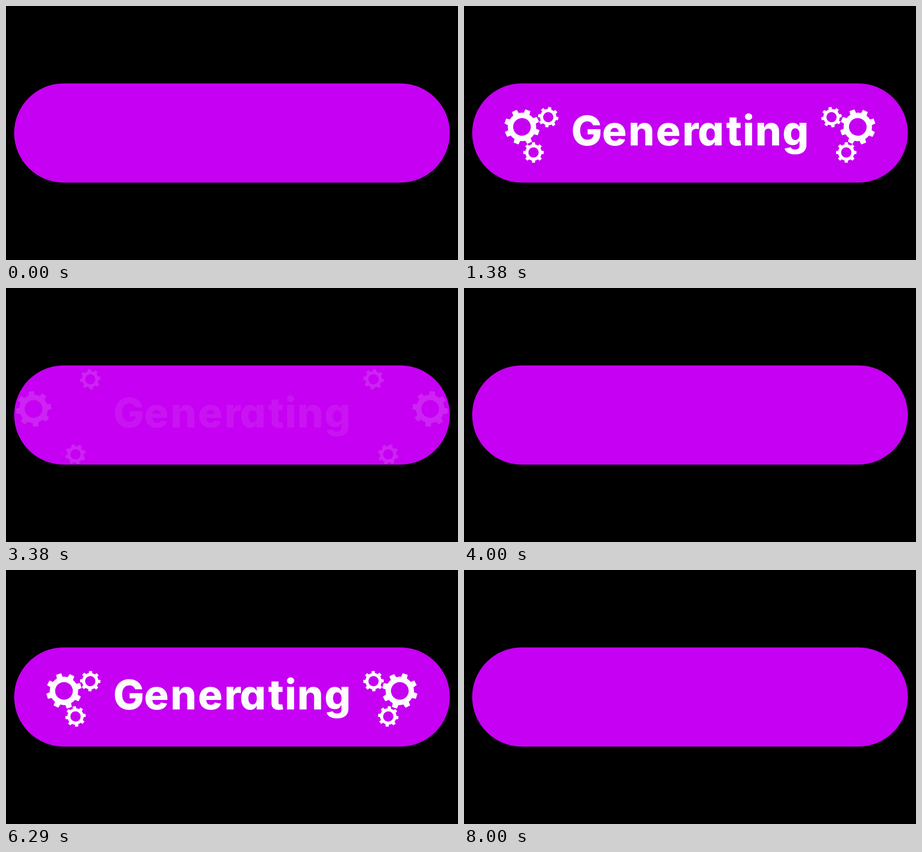
An HTML page for the animation above (8.08 s loop, 998 by 561 pixels).

```html
<!DOCTYPE html>
<html lang="en">
<head>
<meta charset="utf-8">
<title>Generating</title>
<style>
  html, body { margin: 0; width: 100%; height: 100%; overflow: hidden; background: #000; }
  svg { display: block; width: 100vw; height: 100vh; }
  .label {
    font: 800 91px Inter, "Open Sans", sans-serif;
    font-feature-settings: "cv11";
    text-anchor: middle;
    fill: #fdfdfd;
  }
</style>
</head>
<body>
<svg viewBox="0 0 998 561" preserveAspectRatio="none">
  <defs>
    <path id="tooth" d="M-6.8-29L-5.8-39H5.8L6.8-29Z"/>
    <g id="pair"><use href="#tooth"/><use href="#tooth" transform="rotate(180)"/></g>
    <g id="gear" fill="#fdfdfd">
      <circle r="25.4" fill="none" stroke="#fdfdfd" stroke-width="11.8"/>
      <use href="#pair"/>
      <use href="#pair" transform="rotate(45)"/>
      <use href="#pair" transform="rotate(90)"/>
      <use href="#pair" transform="rotate(135)"/>
    </g>
  </defs>
  <rect x="18" y="171" width="962" height="219" rx="109.5" fill="#c600f2"/>
  <g id="left"></g>
  <g id="right" transform="translate(997.5 0) scale(-1 1)"></g>
  <text class="label" x="271 332 392 451 501 545 596 628.5 672 732" y="308">Generating</text>
</svg>
<script>
  const CYCLE = 4040;
  const label = document.querySelector(".label");

  // dx, dy: offset while hidden; angle in degrees, speed in degrees per second
  const gears = [
    { x: 128, y: 267, size: 1, dx: -78, dy: 0, angle: 7, speed: 9 },
    { x: 186, y: 245.5, size: .576, dx: 0, dy: -51, angle: 20, speed: -8 },
    { x: 153.5, y: 323.5, size: .576, dx: 0, dy: 51, angle: 11, speed: -8 }
  ];

  function addGear(side) {
    const node = document.createElementNS("http://www.w3.org/2000/svg", "use");
    node.setAttribute("href", "#gear");
    document.getElementById(side).append(node);
    return node;
  }
  for (const gear of gears) gear.nodes = ["left", "right"].map(addGear);

  function ease(t, start, end) {
    const p = Math.min(1, Math.max(0, (t - start) / (end - start)));
    return (1 - Math.cos(Math.PI * p)) / 2;
  }

  function draw(now) {
    const t = now % CYCLE;
    const shown = ease(t, 0, 1000) - ease(t, 2700, 3600);
    for (const g of gears) {
      const x = g.x + g.dx * (1 - shown);
      const y = g.y + g.dy * (1 - shown);
      const turn = g.angle + g.speed * t / 1000;
      for (const node of g.nodes) {
        node.setAttribute("transform", `translate(${x} ${y}) rotate(${turn}) scale(${g.size})`);
        node.setAttribute("opacity", shown);
      }
    }
    label.setAttribute("opacity", ease(t, 0, 700) - ease(t, 2830, 3500));
  }

  function tick() {
    draw(performance.now());
    requestAnimationFrame(tick);
  }
  tick();
</script>
</body>
</html>
```
